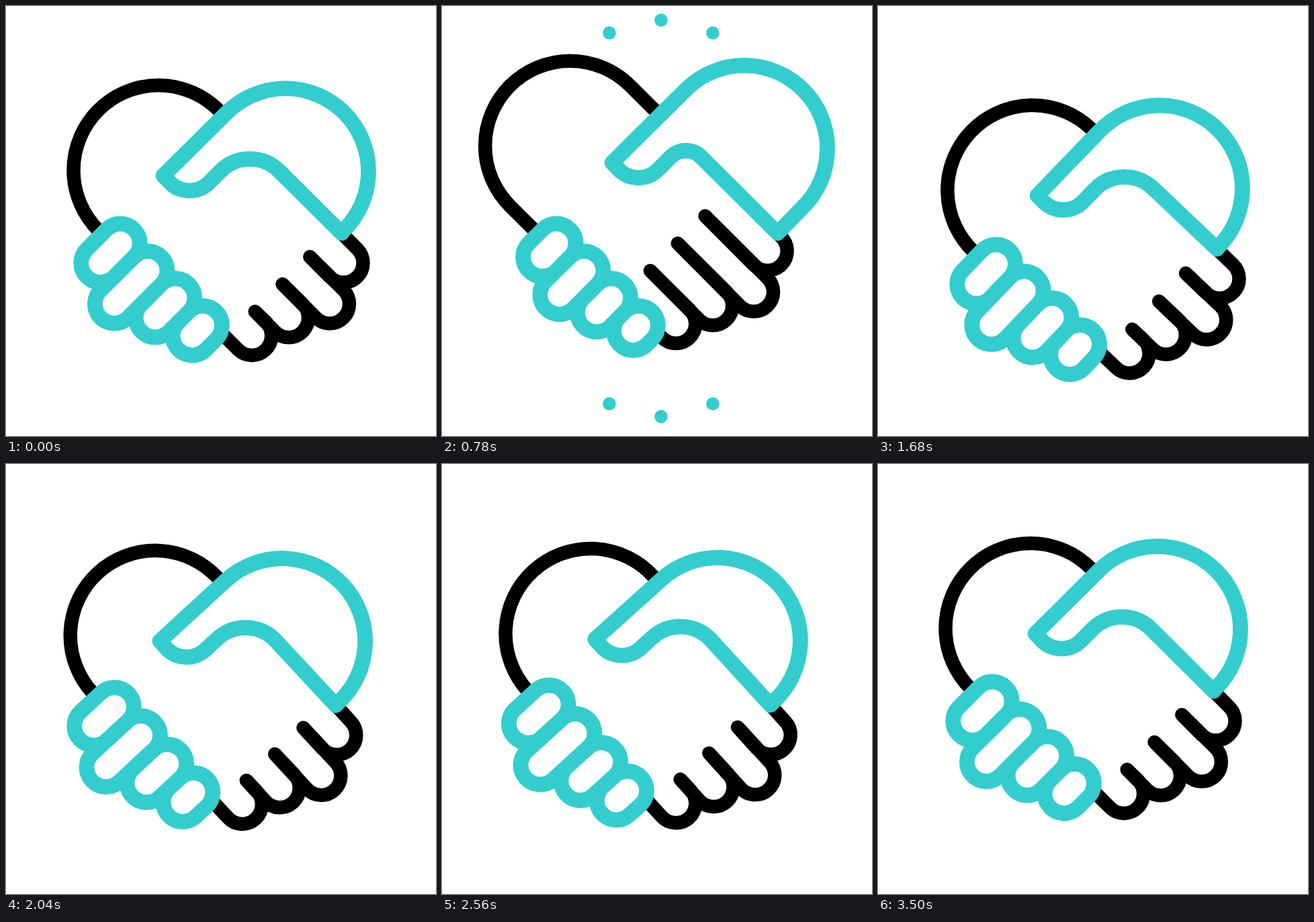
Write an HTML page that moves like this. It is 640 px wide and 640 px high and loops after 3600 ms.

```html
<!DOCTYPE html>
<html lang="en">
<head>
<meta charset="utf-8">
<title>Handshake heart</title>
<style>
  html, body { margin: 0; width: 100%; height: 100%; overflow: hidden; background: #fff; }
  svg { display: block; width: 100%; height: 100%; }
  path { fill: none; stroke-linejoin: round; }
  #back, #fingers { stroke: #000; stroke-width: 20.5; }
  #fingers { stroke-linecap: round; }
  #palm, #knuckles { stroke: #33cdce; stroke-width: 22.8; }
  #dots { fill: #33cdce; }
</style>
</head>
<body>
<svg viewBox="0 0 640 640">
  <g id="hands">
    <path id="back"/>
    <path id="fingers"/>
    <path id="palm"/>
    <path id="knuckles"/>
  </g>
  <g id="dots"></g>
</svg>
<script>
const LOOP = 3600;
const $ = id => document.getElementById(id);

// poses of the shake: tilt in degrees, drop in pixels
const REST = [0, 0], DOWN = [-6, 45.5], UP = [6, 0];
const SHAKE = [[1095, REST], [1540, DOWN], [1870, UP], [2325, DOWN], [2685, UP], [3070, DOWN], [3500, REST]];
const SPREAD = [[0, [0]], [560, [1]], [725, [1]], [1095, [0]]];

// both hands share finger lengths, spaced evenly along a diagonal
const LENGTHS = [29.6, 49.8, 29.7, 15.6];
const PULLS = [9.5, 14.5, 8.7, 8];
const STEP = 40.8;

// eased pose at time t from [time, pose] keys
function poseAt(keys, t) {
  const next = keys.findIndex(([time]) => time > t);
  if (next < 0) return keys[keys.length - 1][1];
  if (next === 0) return keys[0][1];
  const [t0, from] = keys[next - 1], [t1, to] = keys[next];
  const p = (t - t0) / (t1 - t0), ease = p * p * (3 - 2 * p);
  return from.map((v, i) => v + (to[i] - v) * ease);
}

// half circle about (x, y) between the points at (a, b) and (-a, -b) eighths of a turn
function half(x, y, r, a, b, sweep) {
  const q = r * Math.SQRT1_2;
  return `${x + a * q} ${y + b * q}A${r} ${r} 0 0 ${sweep} ${x - a * q} ${y - b * q}`;
}

function backPath(open) {
  const d = 38.7 * open;
  // the ends stay put while the arc moves out
  return `M317.5 156L${half(227 - d, 244.5 - d, 126.5, 1, -1, 0)}L139 335.3`;
}

function palmPath(open) {
  const e = 36.3 * open, s = 20.5 * open, r = 62 - 32 * open, k = r * Math.SQRT1_2;
  return `M499.5 338L${half(416 + e, 246 - e, 123.5, 1, 1, 0)}` +
    `L${234 + s} ${252.5 - s}L${241 + s} ${259.5 - s}` +
    `A41.3 41.3 0 0 0 ${302.3 + s} ${262.7 - s}` +
    `L${363 - k} ${202 + k}A${r} ${r} 0 0 1 ${363 + k} ${202 + k}Z`;
}

function knucklePath(open) {
  return LENGTHS.map((length, i) => {
    const x = 170.2 + STEP * i, y = 352.9 + STEP * i, n = length - PULLS[i] * open;
    return `M${half(x, y, 28.9, -1, -1, 1)}L${half(x - n, y + n, 28.9, 1, 1, 1)}Z`;
  }).join('');
}

function fingerPath(open) {
  const tip = 19 * open, gap = 64.7 * open;
  return LENGTHS.reduce((d, length, i) => {
    const n = length - tip, side = STEP * i;
    const start = i < 3 ? `${452.3 - side - gap} ${373.2 + side - gap}` : '319 485';
    return d + `L${half(472.8 - side + n, 352.8 + side + n, 29.1, 1, -1, 1)}L${start}`;
  }, 'M499.5 338');
}

// three dots above and three below
const dots = [];
for (const sign of [-1, 1]) {
  for (const column of [-1, 0, 1]) {
    const dot = document.createElementNS('http://www.w3.org/2000/svg', 'circle');
    dot.setAttribute('cx', 326 + 77 * column);
    dot.setAttribute('cy', 316 + sign * (column ? 276 : 295));
    dots.push($('dots').appendChild(dot));
  }
}

function draw(t) {
  const [open] = poseAt(SPREAD, t), [tilt, drop] = poseAt(SHAKE, t);
  $('back').setAttribute('d', backPath(open));
  $('palm').setAttribute('d', palmPath(open));
  $('knuckles').setAttribute('d', knucklePath(open));
  $('fingers').setAttribute('d', fingerPath(open));
  $('hands').setAttribute('transform', `translate(0 ${drop}) rotate(${tilt} 320 118)`);
  dots.forEach(dot => dot.setAttribute('r', 10.4 * open));
}

const start = performance.now();
function tick() {
  draw((performance.now() - start) % LOOP);
  requestAnimationFrame(tick);
}
tick();
</script>
</body>
</html>
```
